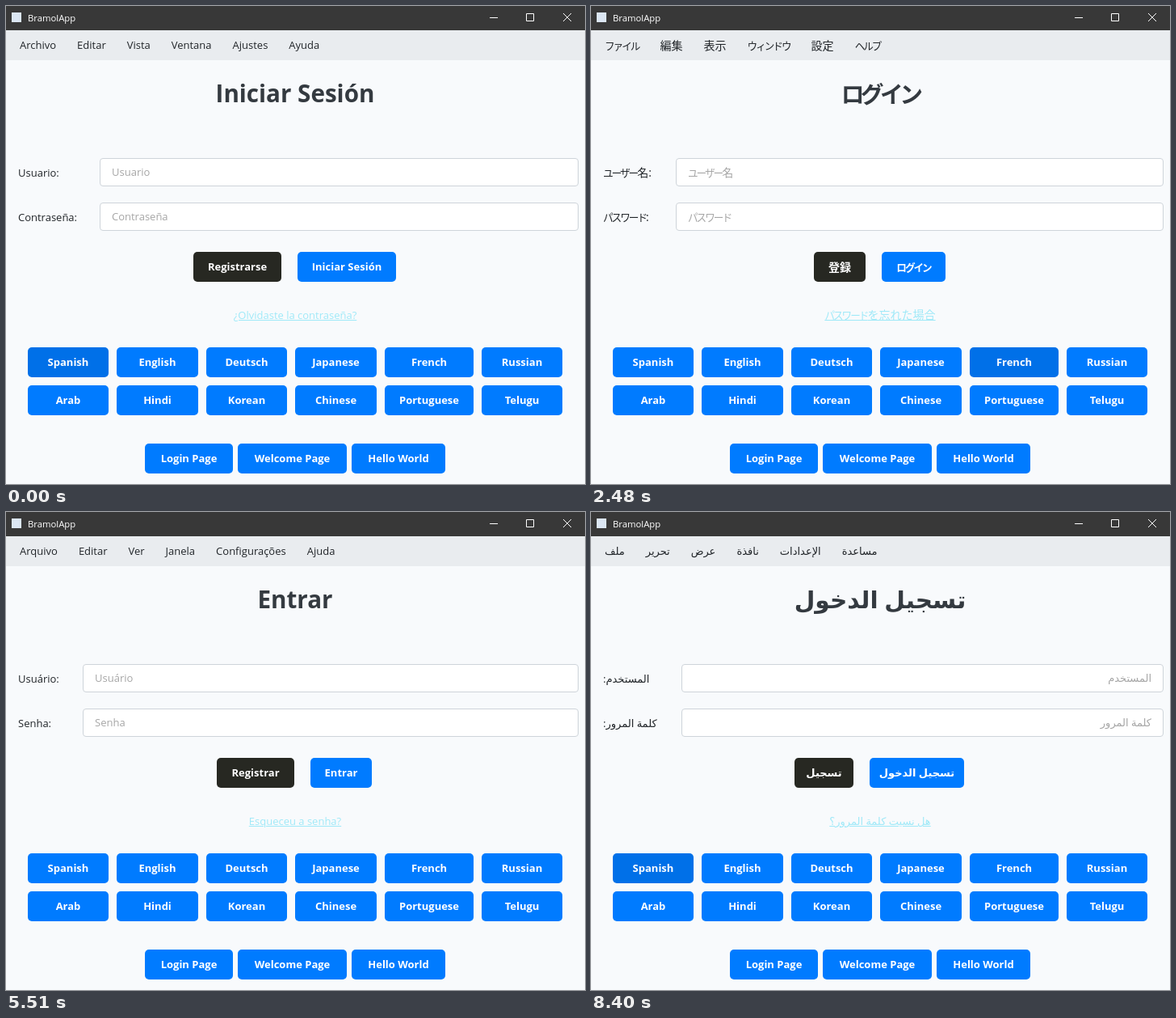
Animation of 717 by 591 pixels, one loop 8640 ms. Source, as an HTML page:

```html
<!DOCTYPE html>
<html lang="es">
<head>
<meta charset="utf-8">
<style>
html, body { margin: 0; width: 717px; height: 591px; overflow: hidden; background: #f8fafc; }
:root { --k: 1; --cjk: "Noto Sans CJK SC"; }
:root:lang(ja) { --k: 1.08; --cjk: "Noto Sans CJK JP"; }
:root:lang(ko) { --k: 1.08; --cjk: "Noto Sans CJK KR"; }
:root:lang(zh) { --k: 1.08; }
body { position: relative; color: #212529; white-space: nowrap;
  font: calc(13px * var(--k))/36px "Open Sans", "Noto Sans", "Noto Sans Devanagari", "Noto Sans Telugu", "DejaVu Sans", var(--cjk), "Noto Sans CJK JP", sans-serif; }
body > * { position: absolute; box-sizing: border-box; }
#bar { left: 0; top: 0; width: 717px; height: 30px; background: #383838; color: #fff; font-size: 11.3px; line-height: 30px; padding-left: 27px; }
#bar svg { position: absolute; left: 0; top: 0; }
#menu { left: 0; top: 30px; width: 717px; height: 37px; line-height: 37px; background: #e9ecef; padding-left: 17px; display: flex; gap: 26px; }
#title, #link { left: 0; width: 716px; text-align: center; }
#title { top: 88px; line-height: 40px; color: #343a40; font-size: calc(29.6px * var(--k)); font-weight: 700; }
:root:lang(zh) #title { top: 86px; }
:root:lang(hi) #title { font-weight: 500; }
#title i { font-style: normal; font-weight: 400; }
#link { color: #9fe9f8; text-decoration: underline; }
.label { left: 15px; }
.field { right: 8px; height: 35px; line-height: 33px; padding: 0 14px; border: 1px solid #ced4da; border-radius: 4px; background: #fff; color: #a6a6a6; }
.label, .field, #link, .btn, #title { unicode-bidi: plaintext; }
.btn { height: 37px; line-height: 37px; border-radius: 5px; background: #007bff; color: #fff; font-weight: 700; text-align: center; }
.fixed { font-size: 13px; }
.dark { background: #272822; }
.hover { background: #0070e8; }
.pressed { background: #0062cc; }
.kana { font-size: .9em; letter-spacing: -.16em; }
</style>
</head>
<body>
<div id="bar">BramolApp<svg width="717" height="30" fill="none" stroke="#fff">
<rect x="7" y="8" width="12" height="12" fill="#dbe6f3" stroke="none"/>
<path d="M599 14.5h10M644.5 9.5h9v9h-9zM690 9l10 10M700 9l-10 10"/></svg></div>
<div id="menu"></div>
<div id="title"></div>
<div id="link"></div>
<script>
// menu | title | user | password | register | sign in | forgot, field x, button widths, form shift, grid shift
const ui = {
  es: ["Archivo,Editar,Vista,Ventana,Ajustes,Ayuda|Iniciar Sesión|Usuario|Contraseña|Registrarse|Iniciar Sesión|¿Olvidaste la contraseña?", 116, 109, 122],
  en: ["File,Edit,View,Window,Settings,Help|Sign In|User|Password|Register|Sign In|Forgot your password?", 104, 89, 79],
  de: ["Datei,Bearbeiten,Ansicht,Fenster,Einstellungen,Hilfe|Anmelden|Benutzer|Passwort|Registrieren|Anmelden|Passwort vergessen?", 103, 115, 102],
  ja: ["ファイル,編集,表示,ウィンドウ,設定,ヘルプ|ログイン|ユーザー名|パスワード|登録|ログイン|パスワードを忘れた場合", 105, 64, 79],
  fr: ["Fichier,Éditer,Affichage,Fenêtre,Paramètres,Aide|Se connecter|Utilisateur|Mot de passe|S'inscrire|Se connecter|Mot de passe oublié ?", 124, 95, 116],
  ru: ["Файл,Правка,Вид,Окно,Настройки,Справка|Войти|Пользователь|Пароль|Регистрация|Войти|Забыли пароль?", 134, 120, 76],
  te: ["ఫైల్,సవరించు,వీక్షించండి,విండో,సెట్టింగ్&zwnj;లు,సహాయం|Oturum Aç|Kullanıcı|Şifre|Kaydol|Oturum Aç|Şifreni mi unuttun?", 95, 81, 106],
  pt: ["Arquivo,Editar,Ver,Janela,Configurações,Ajuda|Entrar|Usuário|Senha|Registrar|Entrar|Esqueceu a senha?", 95, 96, 76],
  zh: ["文件,编辑,视图,窗口,设置,帮助|登<i>录</i>|用户|密码|注册|登录|忘记密码？", 74, 64, 64, 2, 4],
  ko: ["파일,편집,보기,창,설정,도움말|로그인|사용자|비밀번호|등록|로그인|비밀번호를 잊으셨나요?", 103, 64, 79, 1, 1],
  hi: ["फ़ाइल,संपादित करें,देखें,विंडो,सेटिंग्स,सहायता|साइन इन करें|उपयोगकर्ता|पासवर्ड|रजिस्टर करें|साइन इन करें|पासवर्ड भूल गए?", 103, 104, 110, 1, 1],
  ar: ["ملف,تحرير,عرض,نافذة,الإعدادات,مساعدة|تسجيل الدخول|المستخدم|كلمة المرور|تسجيل|تسجيل الدخول|هل نسيت كلمة المرور؟", 112, 73, 117],
};
// enter, press, release, leave
const visits = {
  en: [150, 640, 740, 960], de: [980, 1430, 1530, 1730], ja: [1750, 2100, 2200, 2460],
  fr: [2480, 2910, 3010, 3290], ru: [3310, 3690, 3780, 3990], te: [4020, 4270, 4370, 4610],
  pt: [4710, 5060, 5160, 5510], zh: [5530, 5800, 5910, 6110], ko: [6210, 6520, 6620, 6950],
  hi: [6970, 7270, 7370, 7640], ar: [7660, 8010, 8110, 8350], es: [8400, 9e3, 9e3, 9e3],
};
const LOOP = 8640;
const $ = id => document.getElementById(id);

function add(cls, text = "", x = 0, w = 0) {
  const el = document.createElement("div");
  el.className = cls;
  el.textContent = text;
  if (w) place(el, x, w);
  document.body.append(el);
  return el;
}
function place(el, x, w) {
  el.style.left = x + "px";
  el.style.width = w + "px";
}
const setTop = (el, y) => el.style.top = y + "px";
const kana = s => s.replace(/[ァ-ヶー]+/g, '<span class="kana">$&</span>');

const labels = [add("label"), add("label")];
const fields = [add("field"), add("field")];
const register = add("btn dark"), signIn = add("btn");
const codes = ["es", "en", "de", "ja", "fr", "ru", "ar", "hi", "ko", "zh", "pt", "te"];
const names = "Spanish English Deutsch Japanese French Russian Arab Hindi Korean Chinese Portuguese Telugu".split(" ");
const xs = [27, 137, 248, 358, 469, 589], ws = [100, 101, 100, 101, 110, 100];
const grid = names.map((n, i) => add("btn fixed", n, xs[i % 6], ws[i % 6]));
const pages = [add("btn fixed", "Login Page", 172, 109), add("btn fixed", "Welcome Page", 287, 135), add("btn fixed", "Hello World", 428, 116)];

function showLang(code) {
  const [text, x, w1, w2, dy = 0, gridDy = 0] = ui[code];
  const [menu, title, user, pass, reg, sign, forgot] = kana(text).split("|");
  document.documentElement.lang = code;
  $("menu").innerHTML = menu.split(",").map(m => `<span>${m}</span>`).join("");
  $("title").innerHTML = title;
  $("link").innerHTML = forgot;
  setTop($("link"), 364 + dy);
  [user, pass].forEach((s, i) => {
    labels[i].innerHTML = s + ":";
    fields[i].innerHTML = s;
    fields[i].style.left = x + "px";
    setTop(labels[i], 188 + 55 * i + dy / 2);
    setTop(fields[i], 188 + 55 * i + dy);
  });
  register.innerHTML = reg;
  signIn.innerHTML = sign;
  const left = Math.round(357.4 - (w1 + w2 + 20) / 2);
  place(register, left, w1);
  place(signIn, left + w1 + 20, w2);
  setTop(register, 304 + dy);
  setTop(signIn, 304 + dy);
  grid.forEach((b, i) => setTop(b, (i < 6 ? 422 : 469) + gridDy));
  pages.forEach(b => setTop(b, 541 + gridDy));
}

let shown;
function frame(now) {
  const t = now % LOOP;
  let lang = "es", hot = t < 150 ? "es" : "", pressed = false;
  for (const code in visits) {
    const [enter, press, release, leave] = visits[code];
    if (t >= release) lang = code;
    if (t >= enter && t < leave) {
      hot = code;
      pressed = t >= press && t < release;
    }
  }
  if (lang !== shown) showLang(shown = lang);
  grid.forEach((b, i) => {
    b.className = "btn fixed" + (codes[i] !== hot ? "" : pressed ? " pressed" : " hover");
  });
  requestAnimationFrame(frame);
}
frame(0);
</script>
</body>
</html>
```
